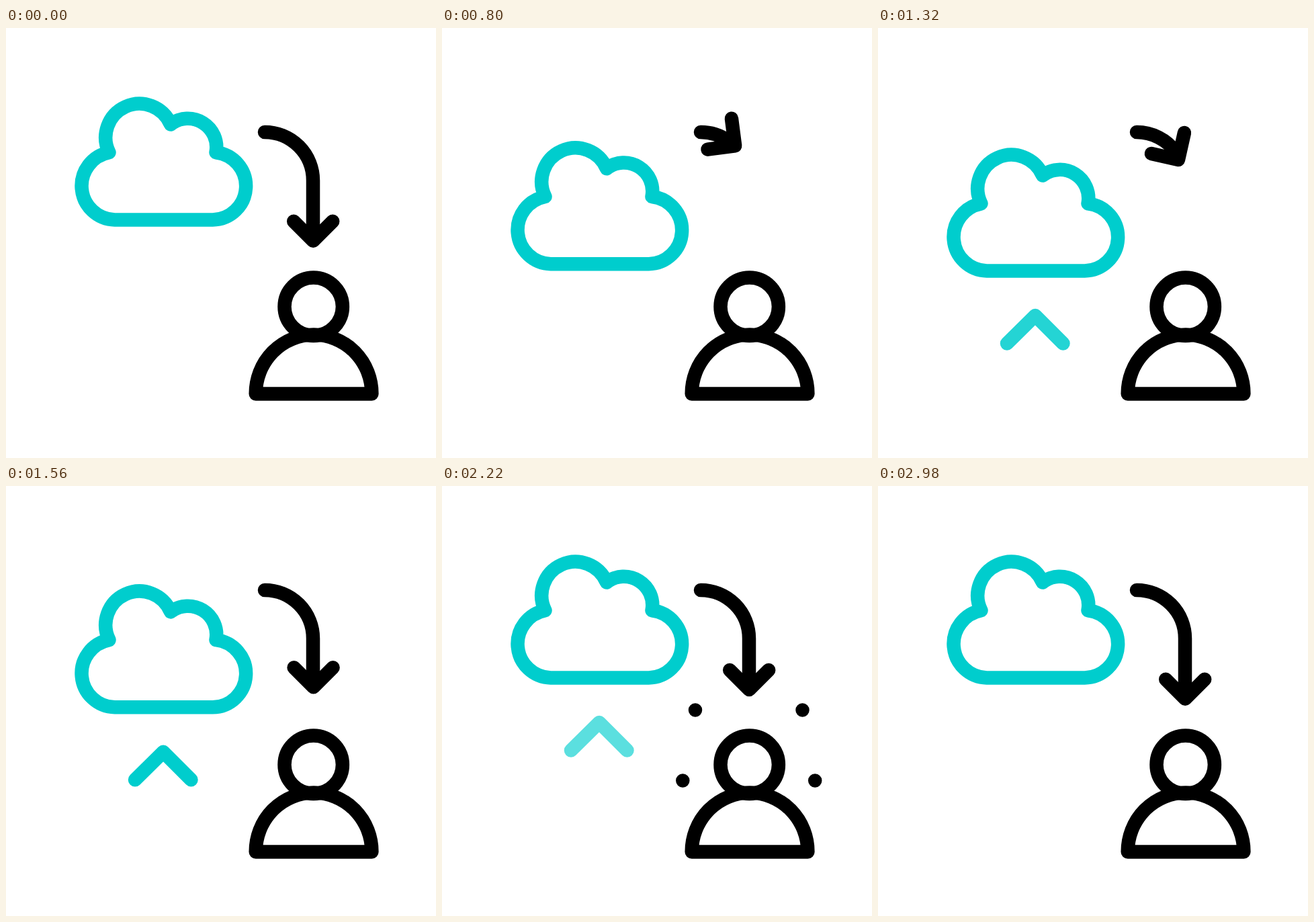
Write an HTML page that moves like this. It is 640 by 640 pixels and loops after 3220 ms.

```html
<!DOCTYPE html>
<html lang="en">
<head>
<meta charset="utf-8">
<title>Cloud to user</title>
<style>
  html, body { margin: 0; height: 100%; overflow: hidden; background: #fff; }
  svg { display: block; width: 100vw; height: 100vh; }
  path, circle { fill: none; stroke: #000; stroke-width: 20.5; stroke-linecap: round; stroke-linejoin: round; }
  .teal path { stroke: #00cdcd; }
  #track { stroke: none; }
</style>
</head>
<body>
<svg viewBox="0 0 640 640">
  <g id="cloud" class="teal">
    <path d="M162 285.5A50.57 50.57 0 0 1 153.5 185.3A50.32 50.32 0 1 1 245 143.5A42.5 42.5 0 0 1 312.5 185.3A50.26 50.26 0 0 1 307.5 285.5Z"/>
    <path id="chevron" d="M192 393.5L234 352L275.5 393.5"/>
  </g>
  <path id="track" d="M457.2 316.7Q461 198 433 172"/>
  <path id="shaft"/>
  <path id="head" d="M-29 -29L0 0L29 -29"/>
  <circle cx="457.7" cy="414.8" r="43.2"/>
  <path d="M371.7 544.4A86.35 87.9 0 0 1 544.4 544.4Z"/>
  <path id="rays"/>
</svg>
<script>
const LOOP = 3220, STEP = 20;
const $ = id => document.getElementById(id);
const cloud = $('cloud'), chevron = $('chevron'), track = $('track');
const shaft = $('shaft'), head = $('head'), rays = $('rays');
const trackLength = track.getTotalLength();

const ramp = (t, a, b) => Math.min(1, Math.max(0, (t - a) / (b - a)));
const ease = (t, a, b) => { const s = ramp(t, a, b); return s * s * (3 - 2 * s); };

// Outer and inner end of each ray on the left; the right side mirrors them.
const RAYS = [[377, 333.6, 397, 353.6], [358.3, 438.6, 386, 438.6]];

function drawArrow(t) {
  const pull = t < 1190 ? 1 - (1 - ramp(t, 200, 1075)) ** 3 : 1 - ease(t, 1190, 1660);
  const lift = 14.5 * (ease(t, 1660, 2320) - ease(t, 2320, 2980));
  const tip = track.getPointAtLength(pull * trackLength);
  const x = tip.x, y = tip.y - lift;
  const turn = -128 * Math.max(0, pull - 0.56);
  head.setAttribute('transform', `translate(${x} ${y}) rotate(${turn})`);

  // The shaft is a quarter circle followed by a straight drop, ending just inside the head.
  const r = 72, cx = 385, cy = 227, quarter = r * Math.PI / 2;
  const along = y > cy ? quarter + y - cy : r * Math.atan2(x - cx, cy - y);
  const end = along - 12;
  const a = Math.min(end, quarter) / r;
  const drop = Math.max(0, end - quarter);
  shaft.setAttribute('d', `M${cx} ${cy - r}A${r} ${r} 0 0 1 ${cx + r * Math.sin(a)} ${cy - r * Math.cos(a)}v${drop}`);
}

function drawRays(t) {
  if (t < 1780 || t > 2230) return rays.setAttribute('d', '');
  const from = ease(t, 1960, 2220), to = ease(t, 1760, 2040);
  const d = RAYS.map(([ox, oy, ix, iy]) => {
    const at = (k, flip) => {
      const x = ix + (ox - ix) * k;
      return `${flip ? 913.5 - x : x} ${iy + (oy - iy) * k}`;
    };
    return [false, true].map(f => `M${at(from, f)}L${at(to, f)}`).join('');
  });
  rays.setAttribute('d', d.join(''));
}

function draw(now) {
  const t = Math.floor((now % LOOP) / STEP) * STEP;
  const dy = 83.5 * (ease(t, 205, 1052) - ease(t, 1172, 1975));
  cloud.setAttribute('transform', `translate(0 ${dy})`);
  chevron.setAttribute('opacity', ramp(t, 1170, 1345) - ramp(t, 2100, 2435));
  drawArrow(t);
  drawRays(t);
}

const start = performance.now();
function tick() {
  draw(performance.now() - start);
  requestAnimationFrame(tick);
}
tick();
</script>
</body>
</html>
```
